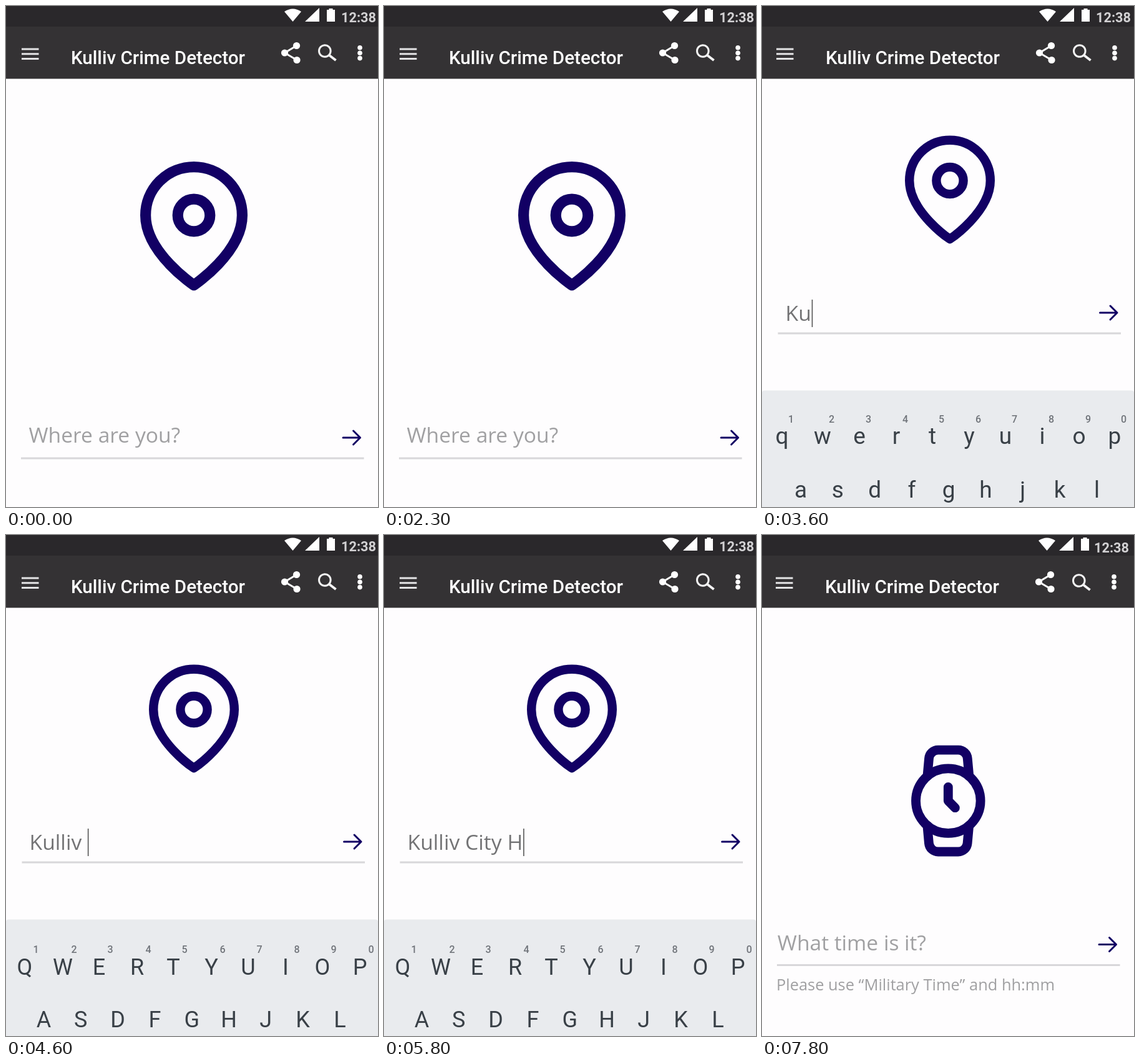
These frames come from a looping animation (596 px wide and 802 px high, 8 s). An HTML page:

```html
<!DOCTYPE html>
<html lang="en">
<head>
<meta charset="utf-8">
<title>Kulliv Crime Detector</title>
<style>
  html, body { margin: 0; width: 100%; height: 100%; overflow: hidden; background: #fefdfe; }
  svg { display: block; width: 596px; height: 802px; }
  text { font-family: "Open Sans", sans-serif; white-space: pre; }
  .ui text { font-family: Roboto, sans-serif; }
  .ink { fill: none; stroke: #120064; stroke-width: 2; stroke-linecap: round; stroke-linejoin: round; }
  .hint { fill: #a0a0a2; font-size: 33.6px; }
  .keys { fill: #394047; text-anchor: middle; }
  .keys .num { fill: #70747a; font-size: 16px; font-weight: 500; }
</style>
</head>
<body>
<svg viewBox="0 0 596 802">
  <rect width="596" height="802" fill="#fefdfe"/>

  <g id="pin" class="ink">
    <path d="M21 10c0 7-9 13-9 13s-9-6-9-13a9 9 0 0 1 18 0z"/>
    <circle cx="12" cy="10" r="3"/>
  </g>
  <g id="watch" class="ink" transform="translate(209.5 336.8) scale(7.4)">
    <circle cx="12" cy="12" r="7"/>
    <path d="M12 9v3l1.5 1.5M16.51 17.35l-.35 3.83a2 2 0 0 1-2 1.82H9.83a2 2 0 0 1-2-1.82l-.35-3.83m.01-10.7l.35-3.83A2 2 0 0 1 9.83 1h4.35a2 2 0 0 1 2 1.82l.35 3.83"/>
  </g>

  <!-- input line; its origin is the left end of the rule -->
  <g id="field">
    <rect y="-1.5" width="549.5" height="3" fill="#d8d7da"/>
    <path class="ink" style="stroke-width:3" d="M516-33h27M532.5-44l11 11-11 11"/>
    <text id="where" class="hint" x="12.5" y="-25">Where are you?</text>
    <g id="entry">
      <text id="typed" x="12" y="-20" font-size="33.7" fill="#737375"></text>
      <rect id="caret" y="-54" width="1.6" height="44" fill="#555"/>
    </g>
    <g id="when">
      <text class="hint" x=".8" y="-23.5">What time is it?</text>
      <text class="hint" x="-1" y="40.5" style="font-size:25.4px">Please use “Military Time” and hh:mm</text>
    </g>
  </g>

  <g id="board" class="ui">
    <path d="M0 802V619.500q0-4 4-4H592q4 0 4 4V802z" fill="#e9ebee"/>
    <g id="lower" class="keys"></g>
    <g id="upper" class="keys"></g>
  </g>

  <g class="ui">
    <rect width="596" height="116.500" fill="#343234"/>
    <rect width="596" height="33" fill="#2a282b"/>
    <g id="head" fill="#fff">
      <path d="M446 9Q459.500 0 473 9L459.500 25zM502 3V25H479zM517.500 4h6v2h3.500V25H514V6h3.500z"/>
      <text id="clock" x="537" y="26" font-size="21.700" font-weight="700" fill="#d2d1d3">12:38</text>
      <path d="M25 69h27.500M25 76.800h27.500M25 84.600h27.500" stroke="#e4e4e5" stroke-width="3"/>
      <text x="104" y="93" font-size="29.600" font-weight="500">Kulliv Crime Detector</text>
      <path d="M465.500 63.500L446.500 75L466 86.500" fill="none" stroke="#fff" stroke-width="3"/>
      <circle cx="465.500" cy="63.500" r="5.600"/>
      <circle cx="446.500" cy="75" r="5.600"/>
      <circle cx="466" cy="86.500" r="5.600"/>
      <g id="search" fill="none" stroke="#f4f4f4">
        <circle cx="510.800" cy="72" r="9.300" stroke-width="3"/>
        <path d="M517.500 78.500l11 8.500" stroke-width="4"/>
      </g>
      <circle cx="567" cy="66.800" r="3.800"/>
      <circle cx="567" cy="75.200" r="3.800"/>
      <circle cx="567" cy="83.600" r="3.800"/>
    </g>
  </g>
</svg>

<script>
const $ = id => document.getElementById(id);
const LOOP = 8000;
const ENTRY = "Kulliv City Hall";
// time at which each character of ENTRY appears
const STROKES = [3200, 3500, 3700, 3900, 4100, 4300, 4600, 4700, 4900, 5000, 5200, 5500, 5700, 6000, 6300, 6500];

const label = (x, y, s, attrs) => `<text x="${x}" y="${y}" ${attrs}>${s}</text>`;

function buildKeys(id, top, home, y1, y2, yNum, size, numShift) {
  const row = (chars, xs, y) => [...chars].map((c, i) => label(xs[i], y, c, `font-size="${size}"`)).join("");
  const numbers = top.xs.map((x, i) => label(x + numShift, yNum, (i + 1) % 10, 'class="num"')).join("");
  const homeXs = [...home].map((c, i) => (id === "upper" ? 60.5 : 62) + 59.3 * i);
  $(id).innerHTML = row(top.chars, top.xs, y1) + row(home, homeXs, y2) + numbers;
}
buildKeys("lower", { chars: "qwertyuiop", xs: [32, 97, 156, 215, 273, 332, 390, 449, 508, 565] },
  "asdfghjkl", 701, 787, 667, 37, 14.5);
buildKeys("upper", { chars: "QWERTYUIOP", xs: [30, 91, 149, 210, 268, 329, 388, 448, 507, 567] },
  "ASDFGHJKL", 704, 788, 669, 36, 18);

const mix = (a, b, p) => a + (b - a) * p;
const easeOut = (t, start, length) => {
  const p = Math.min(1, Math.max(0, (t - start) / length));
  return 1 - (1 - p) ** 3;
};
const move = (id, x, y, k = 1) => $(id).setAttribute("transform", `translate(${x} ${y}) scale(${k})`);
const fade = (id, a) => $(id).setAttribute("opacity", a);

function draw(t) {
  const open = easeOut(t, 2340, 600);
  const close = easeOut(t, 7240, 260);
  const count = STROKES.filter(s => t >= s).length;
  const last = ENTRY[count - 1];
  const caps = !last || last === " " || last !== last.toLowerCase();

  // header nudges sideways with the keyboard case
  move("head", mix(caps ? 0 : -2, -3, close), 0);
  move("clock", -2 * close, 2 * close);
  move("search", 0, close);

  const k = mix(8.6, 7.2, open);
  move("pin", 301 - 12 * k, mix(335, 279.5, open) - 10 * k, k);
  fade("pin", 1 - close);
  fade("watch", close);

  move("field", mix(mix(24, 25.5, open), 24, close), mix(mix(724, 524, open), 688.5, close));
  fade("where", 1 - open);
  fade("entry", open * (1 - close));
  fade("when", close);
  $("typed").textContent = ENTRY.slice(0, count);
  $("caret").setAttribute("x", 12 + (count ? $("typed").getComputedTextLength() + 0.8 : 0));
  fade("caret", t < 7100 ? 1 : 0);

  move("board", 0, 187 * (1 - open + close));
  fade("upper", caps ? 1 : 0);
  fade("lower", caps ? 0 : 1);
}

const begin = performance.now();
function tick() {
  draw((performance.now() - begin) % LOOP);
  requestAnimationFrame(tick);
}
tick();
</script>
</body>
</html>
```
